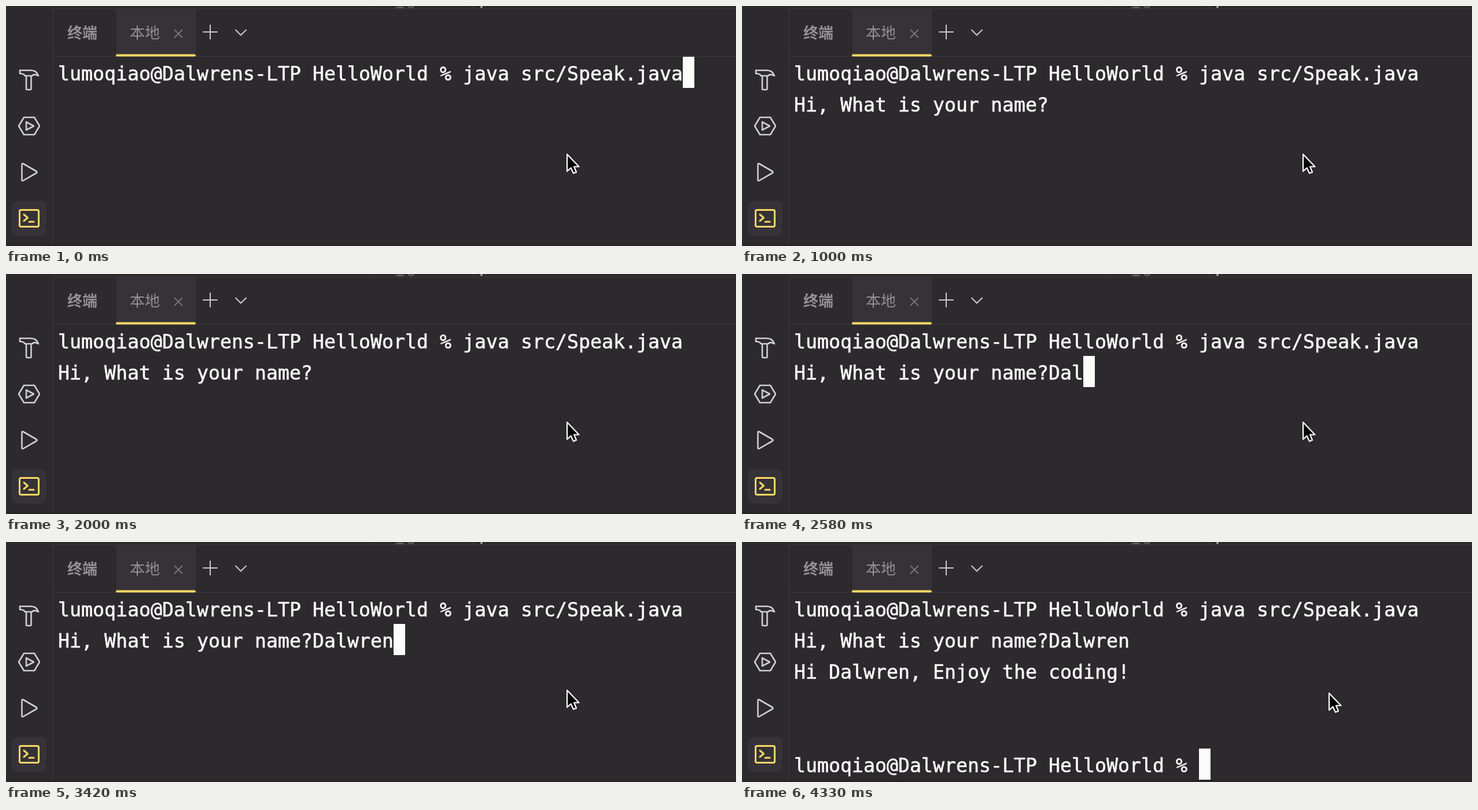
An HTML page that plays this animation: 1262 px wide and 416 px high, repeating every 4420 ms.

```html
<!DOCTYPE html>
<html lang="zh">
<head>
<meta charset="utf-8">
<title>Terminal</title>
<style>
  html, body { margin: 0; width: 100%; height: 100%; overflow: hidden; background: #2d2a2e; }
  svg { display: block; width: 100%; height: 100%; }
  .mono { font: 33.22px "DejaVu Sans Mono", monospace; fill: #fcfcfa; white-space: pre; font-variant-ligatures: none; }
  #screen { stroke: #fcfcfa; stroke-width: 0.6; }
  .tab { font: 26px "Noto Sans CJK SC", "Noto Sans CJK", sans-serif; fill: #939193; }
  .line { fill: none; stroke-linecap: round; stroke-linejoin: round; }
</style>
</head>
<body>
<svg viewBox="0 0 1262 416">
  <rect width="1262" height="416" fill="#2d2a2e"/>

  <!-- editor edge -->
  <svg width="1262" height="4">
    <text class="mono" x="670" y="4" style="fill:#5b595c">10</text>
    <path d="M635 0V4M807 0V4" stroke="#383539" stroke-width="2"/>
    <path d="M823 0L821 3" stroke="#b5b3b5" stroke-width="3"/>
  </svg>
  <path d="M81 5H1262M81 5V416M81 87H1262" fill="none" stroke="#373438" stroke-width="2"/>
  <rect y="412" width="1262" height="4" fill="#282529"/>

  <!-- tabs -->
  <rect x="191" y="6" width="137" height="79" fill="#363338"/>
  <rect x="190" y="83.500" width="138" height="4" rx="2" fill="#ffd866"/>
  <text class="tab" x="106" y="56" style="font-weight:700">终端</text>
  <text class="tab" x="214" y="56">本地</text>
  <g class="line" stroke="#cdcbce" stroke-width="2">
    <path d="M291.500 41.500L304.500 54.500M304.500 41.500L291.500 54.500" stroke="#767478"/>
    <path d="M341 45H365M353 33V57M397 41.500L406 50.500L415 41.500"/>
  </g>

  <!-- sidebar -->
  <g class="line" stroke="#ced0d6" stroke-width="2.600">
    <path d="M24 111.500H43C50 111.500 54 115 56 121C51 118 48 118 45 121H33C31 118 29 117 24 117Z"/>
    <path d="M35 122V143.500Q35 145 36.500 145H42Q43.500 145 43.500 143.500V122"/>
    <path d="M31 193H49L58 208L49 223H31L22 208Z"/>
    <path d="M35 201V215L48 208Z"/>
    <path d="M27.500 275V301Q27.500 304 30 302.500L52.500 289.500Q54.500 288 52.500 286.500L30 273.500Q27.500 272 27.500 275Z"/>
  </g>
  <rect x="10" y="338" width="60" height="60" rx="10" fill="#363338"/>
  <g class="line" stroke="#ffd866" stroke-width="3">
    <rect x="23.500" y="353.500" width="33" height="29" rx="2.500"/>
    <path d="M31 361.500L37.500 367L31 372.500M40 374H48"/>
  </g>

  <g id="screen" class="mono"></g>
  <rect id="caret" width="20" height="54" fill="#fcfcfa"/>
  <path id="pointer" d="M970 257V286.500L976.500 280.500L981 290L986 288L982 278.500H990.500Z"
        fill="#000" stroke="#fff" stroke-width="2.200" stroke-linejoin="round"/>
</svg>
<script>
  const LOOP = 4420, CELL = 20, ROW = 54, LEFT = 90, TOP = 88, BASELINE = 41;
  const ENTER = 80, ASK = 500, DONE = 3920;
  const PROMPT = "lumoqiao@Dalwrens-LTP HelloWorld % ";
  const COMMAND = "java src/Speak.java";
  const QUESTION = "Hi, What is your name?";
  const NAME = "Dalwren";
  const keyTimes = [2080, 2250, 2500, 2750, 3080, 3330, 3420];

  const byId = id => document.getElementById(id);
  const caret = byId("caret"), pointer = byId("pointer");

  const rows = Array.from({ length: 6 }, (_, row) => {
    const text = document.createElementNS("http://www.w3.org/2000/svg", "text");
    text.setAttribute("x", LEFT);
    text.setAttribute("y", TOP + row * ROW + BASELINE);
    return byId("screen").appendChild(text);
  });

  function screenAt(t) {
    const lines = [PROMPT + COMMAND, "", "", "", "", ""];
    let caretRow = t < ENTER ? 0 : 1;
    if (t >= ASK) lines[1] = QUESTION + NAME.slice(0, keyTimes.filter(k => t >= k).length);
    if (t >= DONE) {
      lines[2] = `Hi ${NAME}, Enjoy the coding!`;
      lines[5] = PROMPT;
      caretRow = 5;
    }
    return { lines, caretRow };
  }

  // The caret blinks every 500 ms until the first key is pressed.
  const caretVisible = t => t < ASK || t >= keyTimes[0] || Math.floor(t / 500) % 2 === 1;

  function pointerOffset(t) {
    if (t < 4250) return [0, 0];
    return t < 4330 ? [24, 3] : [45, 5];
  }

  function draw(now) {
    const t = now % LOOP;
    const { lines, caretRow } = screenAt(t);
    rows.forEach((text, i) => {
      if (text.textContent !== lines[i]) text.textContent = lines[i];
    });
    caret.setAttribute("x", LEFT + lines[caretRow].length * CELL);
    caret.setAttribute("y", TOP + caretRow * ROW);
    caret.setAttribute("visibility", caretVisible(t) ? "visible" : "hidden");
    pointer.setAttribute("transform", `translate(${pointerOffset(t)})`);
  }

  const start = performance.now();
  function tick() {
    draw(performance.now() - start);
    requestAnimationFrame(tick);
  }
  tick();
</script>
</body>
</html>
```
